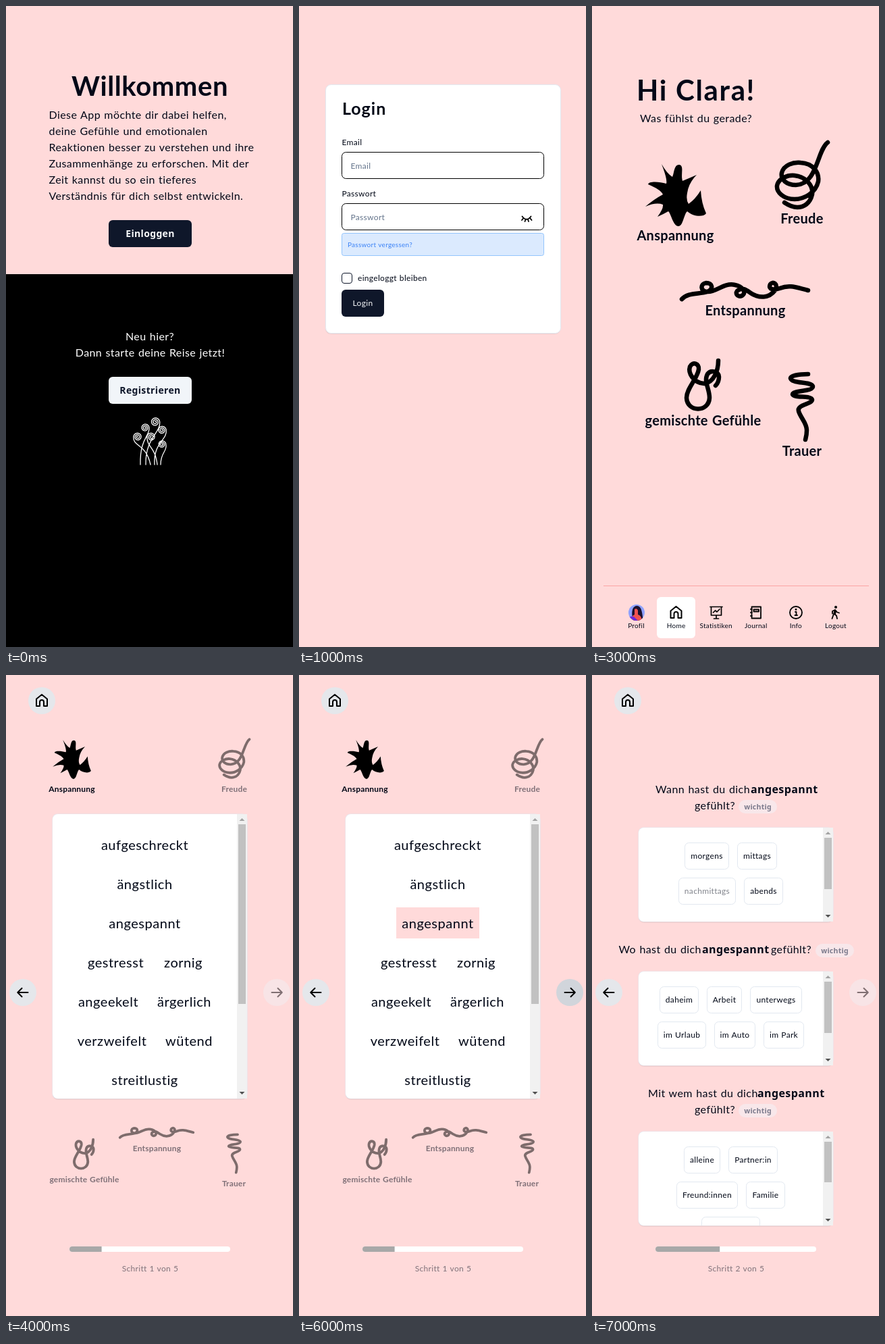
An HTML page that plays this animation: 425x949 px, repeating every 8000 ms.

```html
<!DOCTYPE html>
<html lang="de">
<head>
<meta charset="utf-8">
<title>Gefühle</title>
<style>
  html, body { margin: 0; width: 100%; height: 100%; overflow: hidden; background: #ffdada; }
  svg { display: block; width: 100vw; height: 100vh; }
  text { font-family: Lato, sans-serif; letter-spacing: .026em; word-spacing: .05em; white-space: pre; }
  .bold { font-family: "Noto Sans", sans-serif; font-weight: 700; letter-spacing: .025em; }
  .semi { font-weight: 700; letter-spacing: .04em; word-spacing: 0; }
  .fancy { font-weight: 700; letter-spacing: .015em; }
  .line { fill: none; stroke: #000; stroke-linecap: round; stroke-linejoin: round; }
</style>
</head>
<body>
<svg id="stage" viewBox="0 0 425 949"></svg>
<script>
const INK = '#020817', NAVY = '#0f172a', PINK = '#ffdada', GREY = '#e5e7eb', EDGE = '#e2e8f0';
const stage = document.getElementById('stage');

const rect = (x, y, w, h, fill, r = 0, stroke = 'none') =>
  `<rect x="${x}" y="${y}" width="${w}" height="${h}" rx="${r}" fill="${fill}" stroke="${stroke}"/>`;
const disc = (x, y, r, fill) => `<circle cx="${x}" cy="${y}" r="${r}" fill="${fill}"/>`;
const line = (d, w = 2, color = '#000') =>
  `<path class="line" d="${d}" stroke-width="${w}" style="stroke:${color}"/>`;
const text = (s, x, y, size, fill = INK, cls = '', anchor = 'start') =>
  `<text x="${x}" y="${y}" font-size="${size}" fill="${fill}" class="${cls}" text-anchor="${anchor}">${s}</text>`;
const mid = (s, x, y, size, fill, cls) => text(s, x, y, size, fill, cls, 'middle');
const fade = (s, on = true) => on ? `<g opacity=".5">${s}</g>` : s;

// Welcome screen
function curl(x, y, r, start, dir) {
  const pts = [];
  for (let i = 0; i <= 60; i++) {
    const a = start + dir * i / 60 * Math.PI * 4.6, q = r * (1 - i / 60 * .85);
    pts.push((x + q * Math.cos(a)).toFixed(1) + ' ' + (y + q * Math.sin(a)).toFixed(1));
  }
  return 'M' + pts.join('L');
}

function fern() {
  const R = 0, L = Math.PI;
  const curls = [
    [206, 624.5, 6, R, -1], [221, 616, 6.7, R, -1], [231, 628, 6.2, R, -1],
    [195, 638, 6.2, L, 1], [215, 638, 6.2, L, 1], [231, 649, 5.8, R, -1]
  ].map(c => curl(...c)).join('');
  const stems = 'M212 624.5C213 637 198 640 199 679M227.7 616C229 632 206 640 207 679' +
    'M237.2 628C239 643 218 646 220 679M188.8 638C188 653 207 647 214 679' +
    'M208.8 638C209 654 221 652 224 679M236.8 649C239 660 229 660 229 679';
  return line(curls + stems, 1.3, '#fff');
}

function welcome() {
  const body = ['Diese App möchte dir dabei helfen,', 'deine Gefühle und emotionalen',
    'Reaktionen besser zu verstehen und ihre', 'Zusammenhänge zu erforschen. Mit der',
    'Zeit kannst du so ein tieferes', 'Verständnis für dich selbst entwickeln.'];
  return mid('Willkommen', 213, 133, 40, INK, 'fancy') +
    body.map((s, i) => text(s, 63.5, 167 + 24 * i, 16)).join('') +
    rect(152, 317, 123, 40, NAVY, 6) + mid('Einloggen', 213.5, 342, 14, '#f8fafc', 'bold') +
    rect(0, 397, 425, 552, '#000') +
    mid('Neu hier?', 213, 495, 16, '#fff') +
    mid('Dann starte deine Reise jetzt!', 213.5, 519, 16, '#fff') +
    rect(152, 549, 123, 40, '#f1f5f9', 6) + mid('Registrieren', 213.5, 574, 14, NAVY, 'bold') +
    fern();
}

// Login screen
function login(filled) {
  const field = (label, y, value) => text(label, 63.5, y - 10, 12) +
    rect(63.5, y + .5, 299, 39, '#fff', 6, '#000') +
    text(filled ? value : label, 76.5, y + 25, 12, filled ? INK : '#64748b');
  return rect(39, 118, 348, 368, 'rgba(0,0,0,.06)', 8) +
    rect(39.5, 116.5, 348, 368, '#fff', 8, EDGE) +
    text('Login', 64, 161, 25, INK, 'semi') +
    field('Email', 216, 'clara@post.example') + field('Passwort', 292, '••••••••') +
    line('M330.5 311.5q6.5 8.500 13 0M332 314.500l-2 2.500M335.500 316l-1 3M339 316l1 3M342.500 314.500l2 2.500', 1.8) +
    rect(63.5, 336.5, 299, 33, '#dbeafe', 3, '#93c5fd') +
    text('Passwort vergessen?', 72, 357, 10, '#3b82f6') +
    rect(63.5, 395.5, 15, 15, '#fff', 3.5, NAVY) +
    text('eingeloggt bleiben', 87, 407, 12) +
    rect(63, 420, 63, 40, NAVY, 6) + mid('Login', 94.5, 444, 12, '#f8fafc');
}

// Each feeling: centre and label on the home screen, then centre, scale and label in the questionnaire
const feelings = [
  { name: 'Anspannung', at: [124, 280], label: [123.5, 347], to: [97.5, 125], k: .63, small: [97.5, 173],
    art: '<path d="M103 234Q111 248 119 253C122 248 121 235 129 235C137 236 131 249 134 259Q146 254 155 250Q143 262 141 277Q139 287 143 293Q153 286 161 273Q162 292 169 307C165 313 150 312 141 304C136 308 135 326 128 326C120 326 117 307 113 304Q106 308 97 312Q106 300 105 294Q95 290 79 297Q92 286 105 279Q102 272 83 264C84 259 100 260 110 263Q112 257 103 234Z"/>' },
  { name: 'Freude', at: [311, 250], label: [311, 322], to: [338, 123.5], k: .59, small: [338, 173],
    art: line('M349 202C333 214 334 264 302 265C288 265 279 257 281 247C284 235 298 231 309 232C327 233 337 246 335 260C331 277 314 286 300 286C284 286 273 276 274 266C276 255 290 250 300 251C317 253 328 266 326 279C323 292 314 298 304 298C297 298 291 295 285 291', 6.5) },
  { name: 'Entspannung', at: [226.5, 421.5], label: [227, 458], to: [223, 677.5], k: .58, small: [223.5, 705],
    art: line('M133 434C142 424 158 427 171 423C180 419 179 410 169 410C160 411 160 423 171 423C184 424 195 409 212 413C222 415 230 424 222 429C215 432 211 424 216 421C223 416 228 420 235 425C247 433 262 433 271 421C277 411 267 407 264 412C260 420 270 421 278 418C293 412 303 417 320 421', 6.5) },
  { name: 'gemischte Gefühle', at: [163.5, 560.5], label: [164.5, 621], to: [115, 709], k: .6, small: [116, 751],
    art: line('M187 525C187 540 180 558 166 559C150 558 142 543 145 534C149 526 159 529 158 538C156 552 140 566 140 580C141 602 173 602 174 580C174 566 165 556 171 545C176 538 188 541 188 549C188 555 186 559 183 562', 6.5) },
  { name: 'Trauer', at: [310.5, 593.5], label: [311, 666], to: [337.5, 708.5], k: .58, small: [337.5, 757],
    art: line('M320 545C308 545 290 547 295 553C300 559 324 556 327 563C328 571 297 569 297 575C300 581 325 576 326 583C325 590 303 590 306 600C309 610 318 617 318 628C318 635 317 638 316 642', 6.5) }
];

const largeFeeling = f => f.art + mid(f.name, ...f.label, 20, INK, 'fancy');
const smallFeeling = (f, i) => fade(
  `<g transform="translate(${f.to}) scale(${f.k}) translate(${-f.at[0]} ${-f.at[1]})">${f.art}</g>` +
  mid(f.name, ...f.small, 12, INK, 'fancy'), i > 0);

const house = (x, y) => line(`M${x - 8} ${y - 2.5}l8-6.500 8 6.500V${y + 8}h-5v-6a3 3 0 0 0-6 0v6h-5Z`, 2);

// Home screen
function avatar() {
  return '<clipPath id="round"><circle cx="66" cy="898" r="12"/></clipPath><g clip-path="url(#round)">' +
    rect(54, 886, 24, 24, '#8fa2ff') +
    '<path d="M60 906C58 896 60 888 67 888C74 889 74 898 76 910H58Z" fill="#1b1230"/>' +
    '<path d="M63 893q4-2 5 2v6q5 1 6 9H57q0-6 6-9Z" fill="#f0524f"/>' +
    '<path d="M54 905q6-3 9 0l5 5H54Z" fill="#6a2bd9"/></g>';
}

function home() {
  const tabs = ['Profil', 'Home', 'Statistiken', 'Journal', 'Info', 'Logout'];
  return text('Hi Clara!', 66, 140, 42, INK, 'semi') +
    text('Was fühlst du gerade?', 71, 172, 16) +
    feelings.map(largeFeeling).join('') +
    rect(17, 858, 393, 1, '#fca5a5') +
    rect(96, 875, 57, 61, '#fff', 6) +
    avatar() + house(124.5, 898) +
    line('M175 889.500H193M176.500 890V902H191.500V890M184 902V906M180.500 907H187.500M179.500 898l3-3 2.500 2 4-4', 1.7) +
    line('M236.500 889.500H250V906.500H236.500ZM239.500 893.500H247V896.500H239.500ZM235 893H237M235 898H237M235 903H237', 1.8) +
    line('M293 898a9 9 0 1 0 18 0a9 9 0 1 0-18 0M301 897h1.500v5M300.500 902h3.500', 1.8) + disc(302, 893.5, 1.4, '#000') +
    disc(361, 890, 2, '#000') +
    line('M360 894l-2 6-2.500 7M358.500 900l3.500 2.500 1 4.500M360 894l-4 2v3.500M360.500 894.500l2.500 3 3 1M361 895l-1 6', 1.8) +
    tabs.map((s, i) => mid(s, 65.5 + 59.1 * i, 921, 10)).join('');
}

// Questionnaire parts
const arrow = (x, dir, color, fill) => disc(x, 470, 20, fill) +
  line(`M${x - 7.5} 470h15M${x + dir * 1.5} 463.750l${dir * 6.25} 6.250l${-dir * 6.25} 6.250`, 2, color);

function frame(step, ready) {
  const done = 47.6 * step;
  return disc(53, 38, 20, GREY) + house(53, 38) +
    arrow(25, -1, '#000', GREY) +
    (ready ? arrow(401, 1, '#000', '#d1d5db') : arrow(401, 1, '#806f72', '#f8e4e6')) +
    rect(94, 846, 238, 8, '#fff', 4) + rect(94, 846, 12, 8, '#a8a8a8', 4) +
    rect(98, 846, done - 4, 8, '#a8a8a8') +
    mid(`Schritt ${step} von 5`, 213.5, 883, 12, '#81727a');
}

function panel(y, h, thumb) {
  return rect(69, y + 2, 288, h - 1, 'rgba(0,0,0,.06)', 8) +
    rect(68.5, y - .5, 289, h, EDGE, 8) + rect(69, y, 288, h - 1, '#fff', 8) +
    rect(342, y, 15, h - 1, '#f1f1f1') + rect(344, y + 15, 11, thumb, '#c1c1c1') +
    `<path d="M345.500 ${y + 10}h8l-4-4Z" fill="#a3a3a3"/>` +
    `<path d="M345.500 ${y + h - 11}h8l-4 4Z" fill="#505050"/>`;
}

function words(picked, ready) {
  const rows = [[['aufgeschreckt', 205.5]], [['ängstlich', 205.5]], [['angespannt', 205.5]],
    [['gestresst', 162.5], ['zornig', 262.5]], [['angeekelt', 151.5], ['ärgerlich', 264]],
    [['verzweifelt', 157], ['wütend', 271]], [['streitlustig', 205.5]]];
  return frame(1, ready) + feelings.map(smallFeeling).join('') + panel(206, 422, 266) +
    (picked ? rect(144, 344, 123, 46, PINK) : '') +
    rows.map((row, i) => row.map(([s, x]) => mid(s, x, 259 + 58 * i, 20)).join('')).join('');
}

const pill = (x, y) => rect(x, y, 57, 20, '#f8e7ea', 10) +
  mid('wichtig', x + 28.5, y + 14, 10.5, '#7b7a8c', 'bold');
const chips = (y, list) => list.map(([s, x, w, dim]) =>
  rect(x + .5, y + .5, w - 1, 39, '#fff', 6, EDGE) +
  mid(s, x + w / 2, y + 24, 12, dim ? '#80838b' : INK)).join('');

function details() {
  const strong = (x, y) => text('angespannt', x, y, 16, INK, 'bold');
  return frame(2, false) +
    text('Wann hast du dich', 94, 175, 16) + strong(235, 175) +
    text('gefühlt?', 152, 199, 16) + pill(217, 185) +
    panel(226, 140, 76) +
    chips(248, [['morgens', 137, 66], ['mittags', 215, 59]]) +
    chips(300, [['nachmittags', 128, 85, true], ['abends', 225, 58]]) +
    text('Wo hast du dich', 39.5, 412, 16) + strong(163, 412) +
    text('gefühlt?', 265, 412, 16) + pill(331, 398) +
    panel(439, 140, 76) +
    chips(461, [['daheim', 100, 58], ['Arbeit', 170, 52], ['unterwegs', 234, 77]]) +
    chips(513, [['im Urlaub', 97, 72], ['im Auto', 181, 61], ['im Park', 254, 60]]) +
    text('Mit wem hast du dich', 83, 625, 16) + strong(245, 625) +
    text('gefühlt?', 152, 649, 16) + pill(217, 635) +
    panel(676, 140, 60) +
    chips(698, [['alleine', 136, 54], ['Partner:in', 202, 73]]) +
    chips(750, [['Freund:innen', 125, 91], ['Familie', 228, 58]]) +
    line('M162.500 814.500V808.500a6 6 0 0 1 6-6H242.500a6 6 0 0 1 6 6V814.500', 1, EDGE);
}

// One screen per second
const scenes = [welcome(), login(false), login(true), home(),
  words(false, false), words(true, false), words(true, true), details()];
const begin = performance.now();
let shown = -1;

function draw(now) {
  const i = Math.floor(Math.max(0, now - begin) / 1000) % scenes.length;
  if (i !== shown) {
    shown = i;
    stage.innerHTML = rect(0, 0, 425, 949, PINK) + scenes[i];
  }
  requestAnimationFrame(draw);
}
draw(begin);
</script>
</body>
</html>
```
